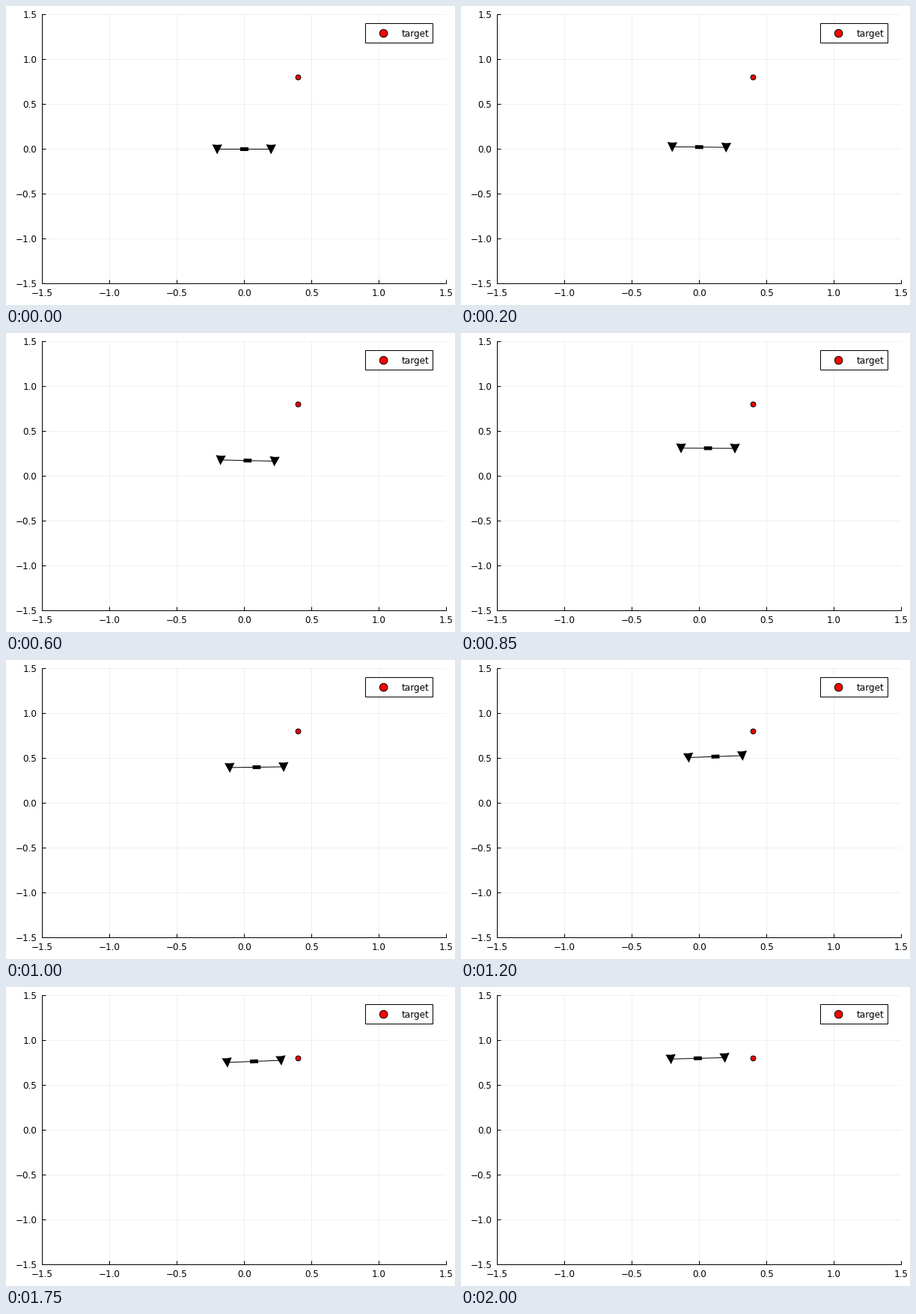
A matplotlib script that plays this animation: 600 px wide and 400 px high, repeating every 2050 ms.

```python
import numpy as np
import matplotlib.pyplot as plt
from matplotlib.animation import FuncAnimation
from matplotlib.patches import Circle, Polygon, Rectangle

W, H, DPI = 600, 400, 100
FRAMES, STEP = 41, 50
SCALE = np.array([180.0, 120.0])  # pixels per data unit
LEFT, TOP = 48.2, 11.4
PX = 72 / DPI  # one pixel in points
ARM, GRAVITY, DURATION = 0.2, 9.81, 2.0
TARGET = (0.4, 0.8)

# Sideways path: a smooth swerve starting at rest, highest power first
SWERVE = np.poly1d([-0.03554, 0.2483, -0.5897, 0.4699, 0, 0, 0, 0])
SIDE_ACCEL = SWERVE.deriv(2)

plt.rcParams.update({"font.family": "DejaVu Sans", "font.size": 12 * PX})


def pose(t):
    """Position and tilt; the tilt supplies the sideways acceleration."""
    s = t / DURATION
    y = TARGET[1] * s * s * (3 - 2 * s)
    return np.array([SWERVE(t), y]), -SIDE_ACCEL(t) / GRAVITY


def rotor_shape(center, down):
    """Arrowhead of fixed pixel size pointing along the body's down axis."""
    d = down * SCALE
    d = d / np.hypot(*d)
    n = np.array([-d[1], d[0]])
    pts = [7 * d, -6.2 * d + 6.7 * n, -5.6 * d, -6.2 * d - 6.7 * n]
    return center + np.array(pts) / SCALE


fig = plt.figure(figsize=(W / DPI, H / DPI), dpi=DPI, facecolor="white")
ax = fig.add_axes([LEFT / W, 1 - (TOP + 360) / H, 540 / W, 360 / H])
ticks = np.arange(-1.5, 1.6, 0.5)
ax.set(xlim=(-1.5, 1.5), ylim=(-1.5, 1.5), xticks=ticks, yticks=ticks)
ax.xaxis.set_major_formatter("{x:.1f}")
ax.yaxis.set_major_formatter("{x:.1f}")
ax.set_axisbelow(True)
ax.grid(color="black", alpha=0.085, lw=0.5)
ax.spines[["top", "right"]].set_visible(False)
ax.spines[["left", "bottom"]].set_linewidth(PX)
ax.tick_params(direction="in", length=5 * PX, width=PX, pad=7 * PX)

ax.plot(*TARGET, "o", ms=6.8 * PX, mfc="red", mec="black", mew=PX)

# Legend, laid out in pixels
key = fig.add_axes([0, 0, 1, 1])
key.set(xlim=(0, W), ylim=(H, 0))
key.axis("off")
key.add_patch(Rectangle((480, 23), 90, 26, fc="white", ec="black", lw=PX))
key.add_patch(Circle((504.6, 36.6), 5.3, fc="red", ec="black", lw=PX))
key.text(528.3, 41, "target", va="baseline")

beam, = ax.plot([], [], color="black", lw=PX)
hub, *rotors = [ax.add_patch(Polygon(np.zeros((4, 2)), fc="black", lw=0))
                for _ in range(3)]


def update(i):
    pos, tilt = pose(i * STEP / 1000)
    along = np.array([np.cos(tilt), np.sin(tilt)])
    up = np.array([-np.sin(tilt), np.cos(tilt)])
    ends = [pos - ARM * along, pos + ARM * along]
    beam.set_data(*np.transpose(ends))
    hub.set_xy([pos + 0.03 * u * along + 0.021 * v * up
                for u, v in ((-1, -1), (1, -1), (1, 1), (-1, 1))])
    for rotor, end in zip(rotors, ends):
        rotor.set_xy(rotor_shape(end, -up))
    return [beam, hub, *rotors]


anim = FuncAnimation(fig, update, frames=FRAMES, interval=STEP,
                     repeat=True, repeat_delay=0)
plt.show()
```
